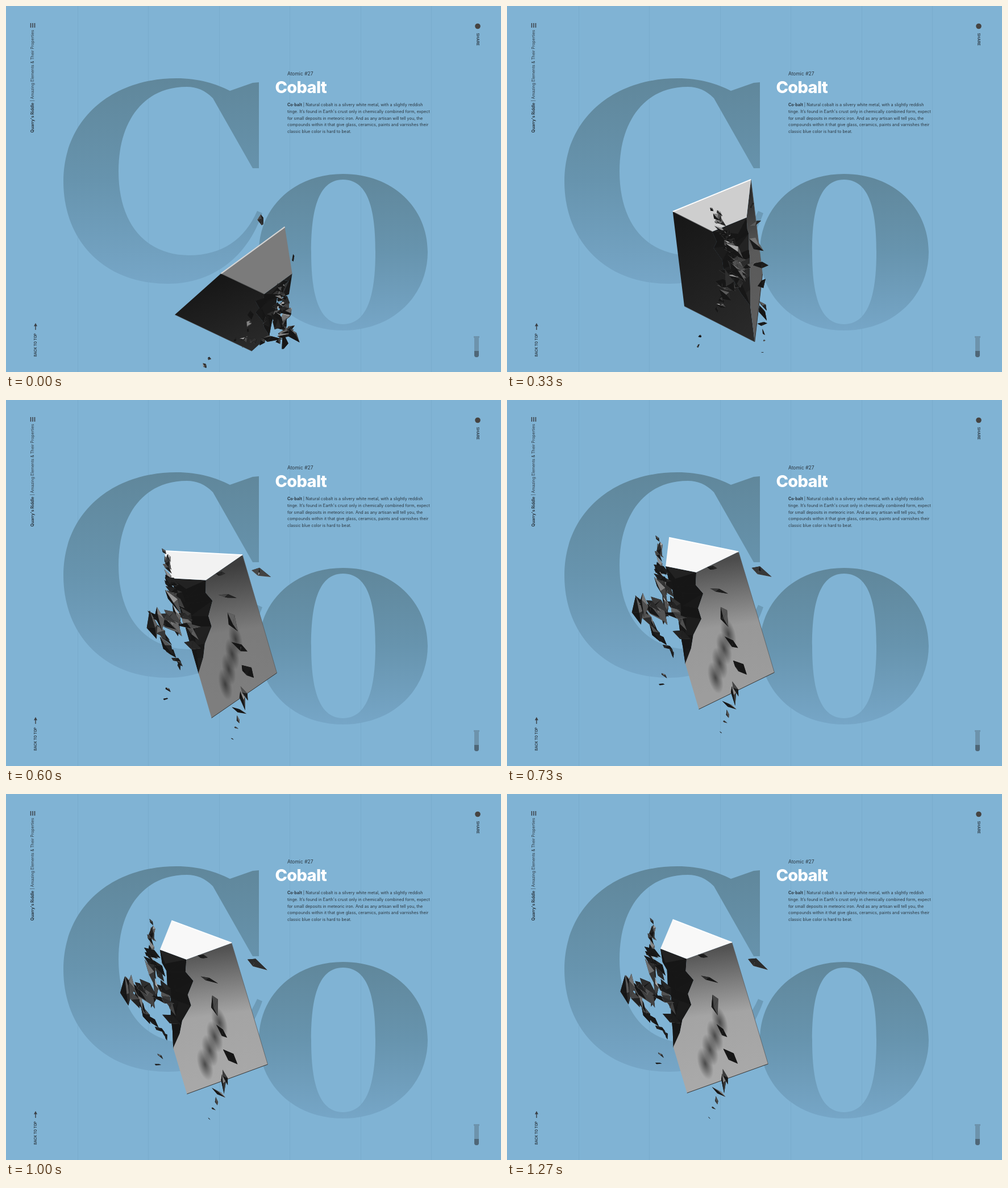
An HTML page with a canvas for the animation above (6 s loop, 871 px wide and 643 px high).

```html
<!DOCTYPE html>
<html lang="en">
<head>
<meta charset="utf-8">
<title>Cobalt</title>
<style>
  html, body { margin: 0; width: 100%; height: 100%; overflow: hidden; background: #80b3d4; }
  svg, canvas { position: absolute; left: 0; top: 0; width: 871px; height: 643px; }
  text { font-family: Inter, sans-serif; font-size: 7.26px; fill: #2b3740; }
  .bold { font-weight: 700; }
  .small { font-size: 6.1px; font-weight: 600; }
  .title { font-size: 29px; font-weight: 800; fill: #fff; letter-spacing: -.025em; }
</style>
</head>
<body>
<svg viewBox="0 0 871 643">
  <defs>
    <linearGradient id="tint" x2="0" y2="1">
      <stop stop-color="#60879b"/>
      <stop offset=".5" stop-color="#6794ae"/>
      <stop offset="1" stop-color="#76a6c7"/>
    </linearGradient>
  </defs>
  <path d="M126.5 0V643M250.5 0V643M375.5 0V643M499.5 0V643M624.5 0V643M748.5 0V643" stroke="#79abcc"/>
  <path fill="url(#tint)" d="M445 134V285H434L364 162C350 148 336 142 318 142C240 142 198 205 198 290C198 385 248 438 322 438C380 438 420 410 442 360L451 364C425 440 365 488 285 488C170 488 101 410 101 308C101 200 185 127 300 127C340 127 370 137 394 149L434 135Z"/>
  <path fill="url(#tint)" fill-rule="evenodd" d="M593 295C680 295 742 354 742 432S680 570 593 570S445 510 445 432S507 295 593 295ZM593 305C547 305 537 365 537 432S547 559 593 559S650 500 650 432S640 305 593 305Z"/>

  <text x="495" y="121.5" style="font-size:8.47px">Atomic #27</text>
  <text x="473.5" y="153" class="title">Cobalt</text>
  <text x="495" y="176"><tspan class="bold">Co·balt</tspan> | Natural cobalt is a silvery white metal, with a slightly reddish</text>
  <text x="495" y="187.7">tinge. It’s found in Earth's crust only in chemically combined form, expect</text>
  <text x="495" y="199.5">for small deposits in meteoric iron. And as any artisan will tell you, the</text>
  <text x="495" y="211.2">compounds within it that give glass, ceramics, paints and varnishes their</text>
  <text x="495" y="223">classic blue color is hard to beat.</text>

  <path d="M43.5 30V38M47 30V38M50.5 30V38" stroke="#3a3f44" stroke-width="1.5"/>
  <text transform="translate(49 222.5) rotate(-90)" style="font-size:6.95px"><tspan class="bold">Quarry's Riddle</tspan> | Amazing Elements &amp; Their Properties</text>
  <text transform="translate(54 616) rotate(-90)" class="small">BACK TO TOP</text>
  <path d="M52 569V560" stroke="#3a3f44" stroke-width="1.4"/>
  <path d="M52 557L55 562.5H49Z" fill="#3a3f44"/>
  <circle cx="830" cy="35.5" r="4.8" fill="#464442"/>
  <text transform="translate(828 47.5) rotate(90)" class="small" style="font-size:6.6px">SHARE</text>
  <path d="M823 580H833V583H832V613A4 4 0 0 1 824 613V583H823Z" fill="#6d93ac"/>
  <path d="M824 606H832V613A4 4 0 0 1 824 613Z" fill="#4f6778"/>
</svg>
<canvas id="stage"></canvas>
<script>
const LOOP = 6000, STEP = 1000 / 15;
const SIDE = 152, HEIGHT = 267;          // equilateral triangular prism
const LIGHT = [.33, -.72, -.61];
const canvas = document.getElementById('stage');
const ctx = canvas.getContext('2d');
const ratio = Math.max(1, window.devicePixelRatio || 1);
canvas.width = 871 * ratio;
canvas.height = 643 * ratio;

const lerp = (a, b, k) => a + (b - a) * k;
const mix = (p, q, k) => p.map((v, i) => lerp(v, q[i], k));
const add = (p, q, k = 1) => p.map((v, i) => v + q[i] * k);
const dot = (p, q) => p.reduce((sum, v, i) => sum + v * q[i], 0);
const cross = (p, q) => [p[1] * q[2] - p[2] * q[1], p[2] * q[0] - p[0] * q[2], p[0] * q[1] - p[1] * q[0]];
const unit = p => p.map(v => v / Math.hypot(...p));
const clamp = (v, lo, hi) => Math.min(hi, Math.max(lo, v));
const gray = v => { v = Math.round(clamp(v, 0, 255)); return `rgb(${v},${v},${v})`; };

function random(seed) {
  return () => {
    seed = (seed * 16807) % 2147483647;
    return seed / 2147483647;
  };
}

// p and q run along two sides of the triangle, h down the prism; the result is centred.
const solid = (p, q, h) => [
  SIDE * (p + q / 2 - .5),
  SIDE * Math.sqrt(3) / 2 * (q - 1 / 3),
  HEIGHT * (h - .5)
];

// The chipped edge: an irregular dark strip of facets that narrows downwards.
function makeChip(rows) {
  const rand = random(77);
  const left = [], middle = [], right = [], facets = [];
  for (let i = 0; i <= rows; i++) {
    const k = i / rows, h = k * .62;
    const depth = .44 * (1 - k * k) * (i ? .85 + rand() * .3 : 1);
    left.push(solid(0, 1 - depth, h));
    right.push(solid(depth, 1 - depth, h));
    middle.push(solid(depth * .35, 1 - depth * (.55 + rand() * .5), h + .02 * rand()));
  }
  for (let i = 0; i < rows; i++) {
    for (const [a, b] of [[left, middle], [middle, right]]) {
      facets.push({ points: [a[i], b[i], a[i + 1]], tone: rand() * .5 });
      facets.push({ points: [b[i], b[i + 1], a[i + 1]], tone: rand() * .5 });
    }
  }
  return { left, right, facets };
}

// A splinter is a flat double pyramid around a random axis.
function makeSplinter(at, size, rand) {
  const centre = solid(...at);
  const axis = unit([rand() * .9, rand() - .5, .2 + rand() * .8]);
  const wide = unit(cross(axis, [rand(), 1, rand()]));
  const thin = cross(axis, wide);
  const tips = [add(centre, axis, size), add(centre, axis, -size * (.6 + rand() * .4))];
  const waist = [0, 1, 2].map(i => {
    const angle = (i + rand() * .6) * Math.PI * 2 / 3;
    const ring = add(centre, wide, Math.cos(angle) * size * .42);
    return add(add(ring, thin, Math.sin(angle) * size * .25), axis, (rand() - .5) * size * .7);
  });
  const tone = .35 + rand() * .65;
  const facets = tips.flatMap(tip =>
    waist.map((w, i) => ({ points: [tip, w, waist[(i + 1) % 3]], tone })));
  return { at, facets };
}

function makeStream(count, from, to, sizeFrom, sizeTo, spread) {
  const rand = random(count * 1000 + sizeFrom * 31);
  return Array.from({ length: count }, (_, i) => {
    const k = i / Math.max(1, count - 1);
    const at = mix(from, to, k).map(v => v + (rand() - .5) * spread);
    return makeSplinter(at, lerp(sizeFrom, sizeTo, k) * (.8 + rand() * .4), rand);
  });
}

const chip = makeChip(7);
const splinters = [
  makeStream(14, [.03, .6, -.23], [-.05, .92, .02], 9, 22, .06),     // crest
  makeStream(12, [-.36, 1.22, .1], [0, .92, .2], 27, 23, .1),        // burst
  makeStream(8, [0, .8, .02], [.03, .85, .4], 18, 22, .08),          // chip
  makeStream(9, [-.32, 1.15, .2], [-.23, .77, .66], 24, 10, .06),    // lower trail
  makeStream(2, [-.52, .79, .95], [-.46, .75, .88], 9, 9, .02),
  makeStream(5, [.66, .4, 0], [.62, .44, .82], 13, 24, .04),         // along the flank
  makeStream(6, [.52, .55, .95], [.2, .85, 1.22], 19, 3, .03),
  makeStream(1, [1.145, -.27, .26], [1.145, -.27, .26], 23, 23, 0)
].flat();

// The turn starts abruptly and eases out; roll settles first, spin last.
function viewAt(step) {
  const rest = step <= 3 ? 1 : clamp(1 - (step - 2) / 15.7, 0, 1) ** 3;
  const deg = Math.PI / 180, drift = rest ** .85;
  const spin = lerp(54.4, -85, rest) * deg;
  const tilt = lerp(56.5, 24, rest * rest * (3 - 2 * rest)) * deg;
  const roll = lerp(73.4, 138.4, rest ** 3) * deg;
  const x0 = lerp(345.3, 420.3, drift), y0 = lerp(371.2, 500.2, drift);
  const [cs, ss, ct, st, cr, sr] = [spin, tilt, roll].flatMap(a => [Math.cos(a), Math.sin(a)]);
  return ([x, y, z]) => {
    const across = x * cs - y * ss, inward = x * ss + y * cs;
    const along = inward * ct + z * st;
    return [x0 + across * sr + along * cr, y0 - across * cr + along * sr, z * ct - inward * st];
  };
}

function trace(points) {
  ctx.beginPath();
  points.forEach(([x, y]) => ctx.lineTo(x, y));
  ctx.closePath();
}

function face(points, fill) {
  trace(points);
  ctx.fillStyle = fill;
  ctx.fill();
}

function line(p, q, color, width) {
  ctx.beginPath();
  ctx.moveTo(p[0], p[1]);
  ctx.lineTo(q[0], q[1]);
  ctx.strokeStyle = color;
  ctx.lineWidth = width;
  ctx.stroke();
}

function ramp(p, q, ...shades) {
  const g = ctx.createLinearGradient(p[0], p[1], q[0], q[1]);
  shades.forEach((v, i) => g.addColorStop(i / (shades.length - 1), gray(v)));
  return g;
}

// Normal of a facet, turned towards the viewer.
function normalOf([a, b, c]) {
  const n = unit(cross(add(b, a, -1), add(c, a, -1)));
  return n[2] > 0 ? n.map(v => -v) : n;
}

function drawFacets(facets, view) {
  facets
    .map(({ points, tone }) => ({ points: points.map(view), tone }))
    .sort((f, g) => g.points.reduce((s, p) => s + p[2], 0) - f.points.reduce((s, p) => s + p[2], 0))
    .forEach(({ points, tone }) => {
      const lit = Math.max(0, dot(normalOf(points), LIGHT));
      face(points, gray(22 + 225 * tone * lit ** 2.2));
    });
}

// Soft shadows cast on the flank, spaced along a slanting row.
function drawShadows(B, C, F) {
  ctx.save();
  ctx.clip();
  ctx.transform(B[0] - C[0], B[1] - C[1], F[0] - C[0], F[1] - C[1], C[0], C[1]);
  for (let i = 0; i < 4; i++) {
    ctx.save();
    ctx.translate(.6 - i * .1, .56 + i * .09);
    ctx.scale(.085, .13);
    const g = ctx.createRadialGradient(0, 0, 0, 0, 0, 1);
    g.addColorStop(0, 'rgba(35,35,35,.7)');
    g.addColorStop(1, 'rgba(35,35,35,0)');
    ctx.fillStyle = g;
    ctx.fillRect(-1, -1, 2, 2);
    ctx.restore();
  }
  ctx.restore();
}

function drawPrism(view, sideSeen, flankSeen) {
  const [A, B, C] = [[0, 0], [1, 0], [0, 1]].map(([p, q]) => view(solid(p, q, 0)));
  const [D, E, F] = [[0, 0], [1, 0], [0, 1]].map(([p, q]) => view(solid(p, q, 1)));
  const left = chip.left.map(view), right = chip.right.map(view);
  const up = (D[1] - A[1]) / HEIGHT;

  face([...left, ...right.slice().reverse()], '#222');
  if (sideSeen) {
    face([A, D, F, ...left.slice().reverse()], ramp(A, F, 22, 32, 43));
    line(D, F, '#444', .7);
  }
  drawFacets(chip.facets, view);
  if (flankSeen) {
    const facing = -normalOf([B, E, F])[2];
    const shade = Math.max(90, 330 * facing - 110);
    const outline = [B, E, F, ...right.slice().reverse()];
    face(outline, ramp(mix(B, C, .25), mix(E, F, .5), shade * .5, shade, shade * 1.03));
    if (facing > .5) drawShadows(B, C, F);
    line(E, F, '#333', 1);
    line(B, E, '#555', .7);
  }
  const cap = 60 + 235 * up;
  face([A, B, right[0], left[0]], gray(cap));
  if (sideSeen) line(A, left[0], '#555', 1);
  line(A, B, gray(cap + 90), 2);
}

function draw(ms) {
  const view = viewAt(Math.floor((ms % LOOP + 4) / STEP));
  const depth = (p, q) => view(solid(p, q, .5))[2];
  const centre = depth(1 / 3, 1 / 3);
  const flankSeen = depth(.5, .5) < centre;
  const sideSeen = depth(0, .5) < centre;
  const inFront = ({ at: [p, q, h] }) =>
    h < 0 || q > .6 || (flankSeen && p + q > 1) || (sideSeen && p < 0);
  const facetsOf = list => list.flatMap(s => s.facets);

  ctx.setTransform(ratio, 0, 0, ratio, 0, 0);
  ctx.clearRect(0, 0, 871, 643);
  drawFacets(facetsOf(splinters.filter(s => !inFront(s))), view);
  drawPrism(view, sideSeen, flankSeen);
  drawFacets(facetsOf(splinters.filter(inFront)), view);
}

const start = performance.now();
function tick() {
  draw(performance.now() - start);
  requestAnimationFrame(tick);
}
tick();
</script>
</body>
</html>
```
